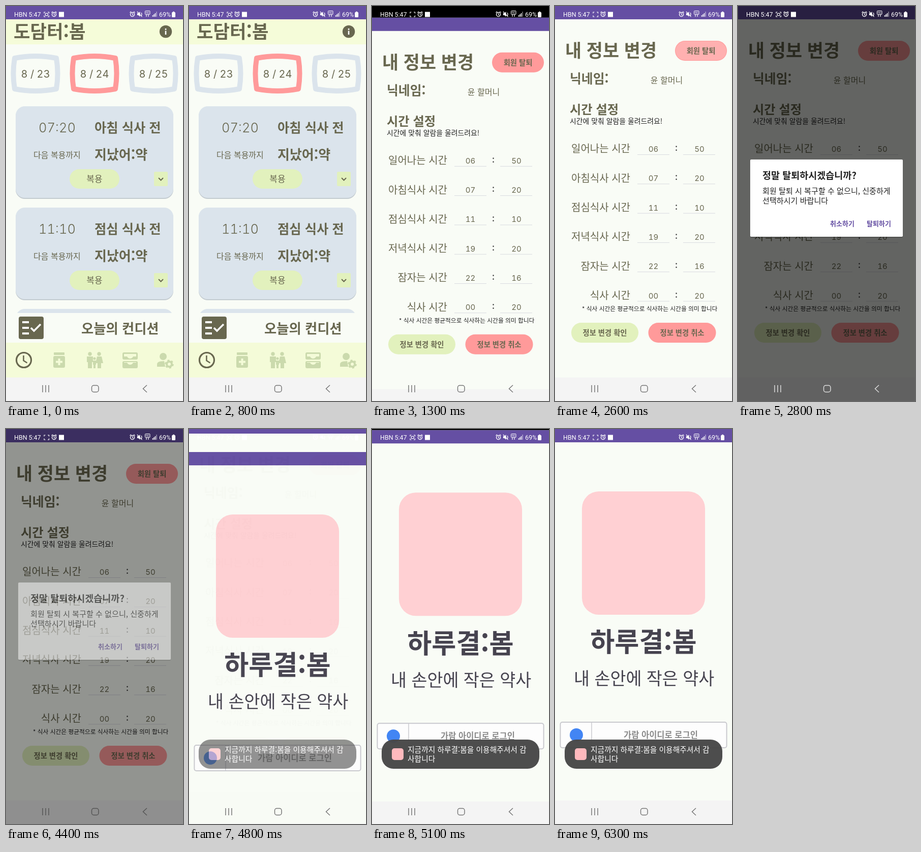
Write an HTML page that moves like this. It is 348 px wide and 772 px high and loops after 6600 ms.

```html
<!DOCTYPE html>
<html lang="ko">
<head>
<meta charset="utf-8">
<style>
html, body { margin: 0; width: 100%; height: 100%; overflow: hidden; background: #000; }
svg { display: block; width: 348px; height: 772px; font-family: "Noto Sans CJK KR", "Noto Sans CJK", "Noto Sans", sans-serif; }
.num { font-family: Inter, sans-serif; font-variant-numeric: tabular-nums; }
.sys { font-family: Roboto, sans-serif; }
</style>
</head>
<body>
<svg id="stage" viewBox="0 0 348 772"></svg>
<script>
const INK = '#68674f', BG = '#f9fcf6', PURPLE = '#654fa3', PINK = '#ff9a9a',
      LIME = '#e2f1bd', BLUE = '#dbe4ec', PALE = '#cbdaad';

const rect = (x, y, w, h, fill, r = 0, extra = '') =>
  `<rect x="${x}" y="${y}" width="${w}" height="${h}" rx="${r}" fill="${fill}" ${extra}/>`;
const dot = (x, y, r, fill, extra = '') => `<circle cx="${x}" cy="${y}" r="${r}" fill="${fill}" ${extra}/>`;
const line = (d, color, w, extra = '') => `<path d="${d}" fill="none" stroke="${color}" stroke-width="${w}" ${extra}/>`;
const shape = (d, fill) => `<path d="${d}" fill="${fill}"/>`;
const group = (id, body) => `<g id="${id}">${body}</g>`;
const at = (x, y, body) => `<g transform="translate(${x} ${y})">${body}</g>`;
// cy is the vertical middle of the glyphs
const text = (s, x, cy, size, weight = 400, color = INK, anchor = 'start') =>
  `<text x="${x}" y="${cy + size * .37}" font-size="${size}" font-weight="${weight}" fill="${color}" text-anchor="${anchor}">${s}</text>`;
const mid = (s, x, cy, size, weight, color) => text(s, x, cy, size, weight, color, 'middle');
const num = (...args) => `<g class="num">${mid(...args)}</g>`;

const LIFT = 17;
const screen = body =>
  rect(0, 0, 348, 772, BG) + body + rect(0, 0, 348, 26, PURPLE) + rect(0, 726, 348, 46 + LIFT, '#f4f4f4');

const chip = (day, x, color) => at(x, 132,
  `<path d="M-41-30Q0-38 41-30Q46 0 41 30Q0 38-41 30Q-46 0-41-30Z" fill="${BG}" stroke="${color}" stroke-width="10" stroke-linejoin="round"/>` +
  num('8 / ' + day, 0, .5, 20));

const card = (y, time, meal) => at(0, y,
  rect(19, 2, 310, 179, '#c3cbd0', 18) + rect(19, 0, 310, 179, BLUE, 18) +
  num(time, 100.5, 42, 25.5, 300) + text(meal, 174, 42, 25.3, 800) +
  text('다음 복용까지', 54, 95, 16) + text('지났어:약', 174, 94, 26, 800) +
  rect(125, 123, 98, 38, LIME, 19) + mid('복용', 174, 142, 17) +
  rect(291, 128, 27, 28, LIME, 2) + line('M300 140l4.5 4.5 4.5-4.5', INK, 2));

const tabs =
  dot(35, 692, 14.5, 'none', `stroke="${INK}" stroke-width="3.2"`) +
  line('M34.5 683v10l7 4.5', INK, 2.6) +
  rect(94, 677, 21, 5, PALE, 1) + rect(93, 684, 23, 23, PALE, 3) +
  line('M104.5 689v13M98 695.5h13', '#f4fbd8', 4) +
  at(174, 692,
    dot(-9, -12, 3.7, PALE) + dot(9, -12, 3.7, PALE) + dot(0, -3, 2.6, PALE) +
    shape('M-15-7h12v11h-2v12h-8V4h-2zM5-7h9l3 13h-4v10H6V6H2zM-3 1h6v8H2v7h-4V9h-1z', PALE)) +
  at(244, 692,
    rect(-15, -15, 30, 14, PALE, 3) + rect(-15, 2, 30, 14, PALE, 3) +
    shape('M-12-12h24v5H6q-2 4-6 4t-6-4h-6zM-12 5h6q2 4 6 4t6-4h6v-1h-24z', '#f4fbd8')) +
  at(313, 692,
    dot(-4, -7, 7, PALE) + shape('M-16 13V8q0-6 14-6l2 11z', PALE) +
    dot(8, 8, 5, 'none', `stroke="${PALE}" stroke-width="4"`) +
    dot(8, 8, 7.5, 'none', `stroke="${PALE}" stroke-width="2.5" stroke-dasharray="3.9 3.95"`));

const home = screen(
  rect(0, 26, 348, 49, '#f5fcd9') + text('도담터:봄', 15, 50, 35.3, 900) +
  dot(314, 50, 12.2, INK) + rect(312.7, 48.5, 2.6, 7.5, '#fff') + rect(312.7, 44, 2.6, 2.7, '#fff') +
  chip(23, 58, BLUE) + chip(24, 174, PINK) + chip(25, 290, BLUE) +
  card(196, '07:20', '아침 식사 전') + card(394, '11:10', '점심 식사 전') +
  rect(19, 592, 310, 60, BLUE, 18) + rect(0, 600, 348, 58, BG) +
  rect(25, 607, 49, 44, INK, 4) +
  line('M32 618h13M32 629h13M32 640h13', '#fff', 4) + line('M49 629l6 6 13-13', '#fff', 3.6) +
  text('오늘의 컨디션', 148, 630, 26.3, 800) +
  rect(0, 658, 348, 68, '#f4fbd8') + tabs);

const row = ([label, hour, minute], i) => at(0, 279 + i * 57.3,
  text(label, 148, 0, 20, 400, INK, 'end') +
  num(hour, 193.5, .5, 15) + num(minute, 284, .5, 15) + mid(':', 238.5, 0, 14, 800, '#333') +
  line('M162 11.5h63M252 11.5h63', '#d9dbe0', 1));

const profile = screen(
  text('내 정보 변경', 20, 87, 34.9, 800) +
  rect(236, 68, 102, 39, PINK, 19.5) + group('press', rect(237, 69, 100, 37, '#fff', 18.5, 'opacity=".22"')) +
  mid('회원 탈퇴', 287, 88, 14.3, 700) +
  text('닉네임:', 29, 142, 24.8, 800) + mid('윤 할머니', 219.5, 145, 16) +
  text('시간 설정', 29, 202, 24.3, 700) +
  text('시간에 맞춰 알람을 울려드려요!', 29, 225, 13.9, 400, '#222') +
  [['일어나는 시간', '06', '50'], ['아침식사 시간', '07', '20'], ['점심식사 시간', '11', '10'],
   ['저녁식사 시간', '19', '20'], ['잠자는 시간', '22', '16'], ['식사 시간', '00', '20']].map(row).join('') +
  text('* 식사 시간은 평균적으로 식사하는 시간을 의미 합니다', 53, 592, 11.75, 400, '#222') +
  rect(32, 619, 132, 39, LIME, 19.5) + mid('정보 변경 확인', 98, 639, 14.3, 700) +
  rect(183.5, 619, 133, 39, PINK, 19.5) + mid('정보 변경 취소', 250, 639, 14.3, 700));

const splash = screen(
  rect(53, 122, 242, 241, '#ffd0d3', 33) +
  mid('하루결:봄', 174, 416, 52.3, 800, '#46434f') +
  text('내 손안에 작은 약사', 37, 488, 33.7, 400, '#46434f') +
  rect(10.5, 573, 327, 50, '#fdfdfd', 4, 'stroke="#c9c9ce" stroke-width="2"') +
  line('M72 573v50', '#c9c9ce', 1.5) + dot(42, 598, 13, '#4285f4') +
  text('가람 아이디로 로그인', 135, 598, 16.5, 700, '#8b8b8b'));

const dialog =
  rect(24, 302, 300, 151, '#000', 3, 'opacity=".2"') + rect(24, 300, 300, 151, '#fff', 2) +
  text('정말 탈퇴하시겠습니까?', 48, 331, 18.5, 700, '#222') +
  text('회원 탈퇴 시 복구할 수 없으니, 신중하게', 48, 361, 15.1, 400, '#222') +
  text('선택하시기 바랍니다', 48, 380, 15.1, 400, '#222') +
  text('취소하기', 181, 425, 13, 700, PURPLE) + text('탈퇴하기', 253, 425, 13, 700, PURPLE);

const toast =
  rect(19, 607, 310, 57, '#484848', 23, 'opacity=".97"') + rect(39, 624, 23, 23, '#ffb9bd', 5) +
  text('지금까지 하루결:봄을 이용해주셔서 감', 70, 627, 14.75, 400, '#fff') +
  text('사합니다', 70, 645, 14.75, 400, '#fff');

const alarm = x => at(x, 16,
  dot(0, .5, 4, 'none', 'stroke="#fff" stroke-width="1.4"') +
  line('M0-2V1l2 1M-5-3l2.5-2.2M5-3L2.5-5.2', '#fff', 1.2));
const label = (s, x, cy, size) => `<g class="sys">${text(s, x, cy, size, 400, '#fff')}</g>`;

const status =
  label('HBN', 16, 16, 12.5) + label('5:47', 44.5, 16, 12.5) + label('69%', 301, 16, 12.5) +
  line('M77.5 12h-2.5v2.5M82 12h2.5v2.5M77.5 21h-2.5v-2.5M82 21h2.5v-2.5', '#fff', 1.2) +
  group('rec', rect(77.3, 14.3, 5, 4.4, 'none', 1, 'stroke="#fff" stroke-width="1.2"')) +
  alarm(94.5) + rect(104, 11.5, 10, 10, '#fff') + alarm(248.5) +
  shape('M258 14h2.5l3-3v10l-3-3H258z', '#fff') + line('M258 11l9.5 10M266 13q2 3 0 6', '#fff', 1.2) +
  rect(273.5, 9.5, 9.5, 7, 'none', 1, 'stroke="#fff"') + label('5G', 274.5, 13, 6) +
  line('M276 21v-4M280 17v4', '#fff', 1.2) +
  line('M288.5 21v-3M291 21v-5M293.5 21v-7', '#fff', 1.5) + line('M296 21v-10', '#fff', 1.5, 'opacity=".5"') +
  rect(326, 12, 7, 10, '#fff', 1.5) + rect(328, 10.8, 3, 2, '#fff');

const keys = '<g id="keys" fill="none" stroke-width="1.5">' +
  '<path d="M72 741v14M78 741v14M84 741v14M277 741l-7.5 7 7.5 7"/>' +
  '<rect x="168.5" y="741.5" width="13.5" height="13" rx="4"/></g>';

const stage = document.getElementById('stage');
stage.innerHTML = group('home', home) + group('profile', profile) + group('splash', splash) +
  group('scrim', rect(0, 0, 348, 772, '#000')) + group('dialog', dialog) + group('toast', toast) +
  group('status', status) + keys;

const parts = {};
for (const g of stage.querySelectorAll('g[id]')) parts[g.id] = g;

const clamp = v => Math.max(0, Math.min(1, v));
const show = (id, opacity, transform = '') => {
  const g = parts[id];
  g.setAttribute('display', opacity > 0 ? 'inline' : 'none');
  g.setAttribute('opacity', opacity);
  g.setAttribute('transform', transform);
};
const moveY = y => `translate(0 ${y.toFixed(2)})`;

const LOOP = 6600, STEP = 100, OPEN_PROFILE = 1200, OPEN_SPLASH = 4768;

// A new screen rises and fades in while the old one lifts away
function enter(id, age) {
  const y = 62 * Math.exp(-age / 100);
  show(id, age < 0 ? 0 : clamp(.78 + age / 160), moveY(y < .5 ? 0 : y));
}
function leave(id, age) {
  show(id, age < 100 ? 1 : 0, moveY(age < 0 ? 0 : -LIFT));
}

function draw() {
  const t = Math.floor(performance.now() % LOOP / STEP) * STEP;

  leave('home', t - OPEN_PROFILE);
  if (t < OPEN_SPLASH) enter('profile', t - OPEN_PROFILE);
  else leave('profile', t - OPEN_SPLASH);
  enter('splash', t - OPEN_SPLASH);

  const open = clamp((t - 2600) / 200), close = clamp((t - 4250) / 300);
  const scale = .9 + .1 * open;
  show('scrim', .6 * open * (1 - close ** 1.7));
  show('dialog', open * (1 - close), `translate(174 375.5) scale(${scale}) translate(-174 -375.5)`);
  show('press', t >= 2600 && t < 2800 ? 1 : 0);
  show('toast', clamp((t - 4740) / 100));

  show('rec', (t + 200) % 1000 < 500 ? 1 : 0);
  parts.keys.setAttribute('stroke', t >= 2700 && t < 4300 ? '#dcdcdc' : t >= 4300 && t < 4600 ? '#555' : '#777');
  requestAnimationFrame(draw);
}
draw();
</script>
</body>
</html>
```
